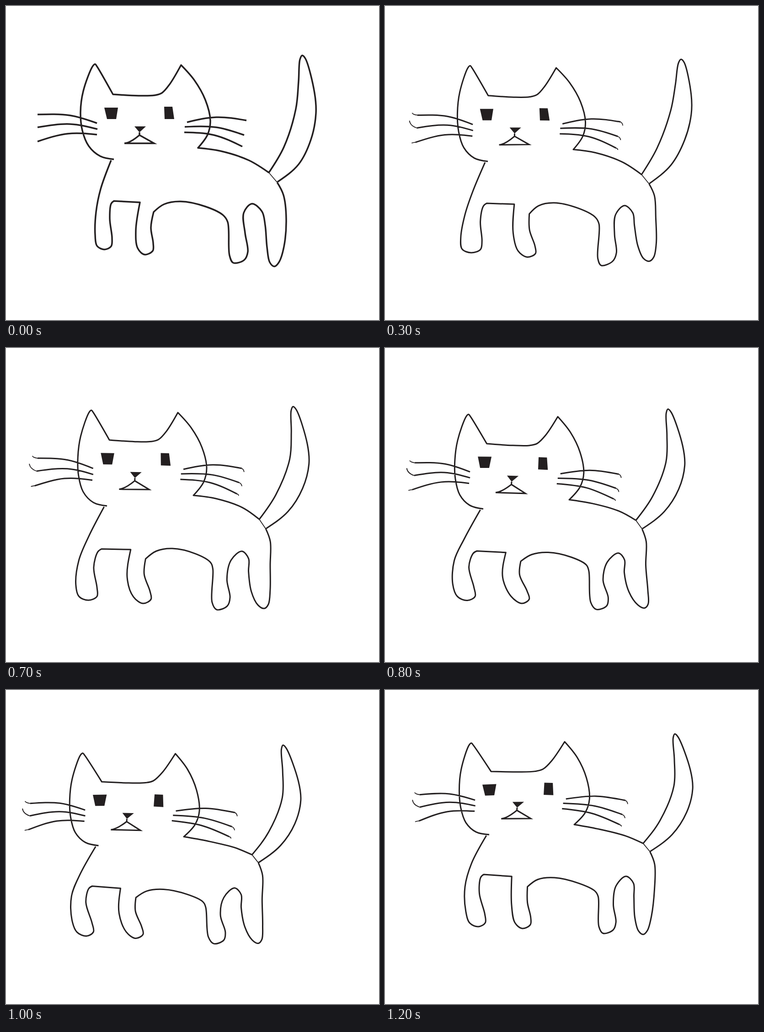
Animation of 816 by 686 pixels, one loop 1300 ms. Source, as an HTML page:

```html
<!DOCTYPE html>
<html lang="en">
<head>
<meta charset="utf-8">
<title>Walking cat</title>
<style>
  html, body { margin: 0; width: 100%; height: 100%; overflow: hidden; background: #fff; }
  svg { display: block; width: 816px; height: 686px; }
  path { fill: none; stroke: #231f20; stroke-linejoin: round; }
  #mouth { stroke-linejoin: miter; }
  #solid { fill: #231f20; stroke: none; }
</style>
</head>
<body>
<svg viewBox="0 0 816 686">
  <path id="thin" stroke-width="1.8"/>
  <path id="lines"/>
  <path id="mouth"/>
  <path id="solid"/>
</svg>
<script>
// The cat is drawn once; joints then pull the whole drawing into each pose.
const cat = {
  head: [236,335, 206,328, 181,306, 167,272, 163,232, 169,186, 190,131, 195,127, 199,132, 234,193],
  crown: [234,193, 290,196, 325,195, 341,190, 358,171, 383,129],
  cheek: [383,129, 412,162, 436,205, 447,250, 441,281, 420,310],
  back: [420,310, 470,317, 531,337, 575,364],
  tail: [575,364, 608,308, 634,225, 640,165, 643,117, 648,108, 655,115, 675,190, 678,235, 667,292, 640,346, 593,385],
  hind: [593,385, 607,413, 613,465, 608,526, 597,560, 587,569, 577,560, 571,527, 567,479, 560,449, 538,432,
    520,452, 523,496, 529,537, 521,555, 497,561, 489,545, 485,472, 475,457, 436,438, 382,427, 346,433, 323,450],
  fore: [323,450, 317,484, 322,518, 321,535, 303,543, 288,529, 284,490, 293,429],
  front: [236,426, 230,432, 227,465, 232,507, 230,525, 215,532, 199,524, 195,500, 197,450, 207,400, 230,337],
  eyes: [215,222, 245,222, 241,247, 221,247, 346,220, 364,220, 368,247, 347,247],
  face: [281,263, 306,263, 292,276, 292,282, 259,300, 324,300]
};

// Tip, middle and root, with the curl that grows at the tip.
const whiskers = [
  { line: [69,237, 140,239, 199,256], curl: [-11, -5] },
  { line: [69,265, 140,258, 200,269], curl: [-16, -16] },
  { line: [69,296, 135,279, 199,281], curl: [-8, 2] },
  { line: [526,250, 460,243, 396,254], curl: [5, 8] },
  { line: [521,282, 460,265, 391,264], curl: [6, 8] },
  { line: [517,307, 455,282, 390,276], curl: [4, 4] }
];

// Path of each joint through the key poses: stand, lift, plant, crouch, reach, rise.
const joints = Object.values({
  leftEar: [195,127, 183,134, 190,127, 187,136, 179,154, 173,122],
  rightEar: [383,129, 373,134, 376,136, 376,141, 380,159, 377,119],
  chin: [236,335, 226,341, 224,338, 221,345, 209,358, 212,322],
  nape: [420,310, 413,311, 411,316, 410,322, 396,341, 398,300],
  nose: [292,276, 283,279, 284,278, 282,284, 272,300, 273,263],
  leftWhisker: [69,265, 69,272, 70,261, 67,269, 60,288, 60,262],
  rightWhisker: [521,282, 507,281, 512,289, 510,294, 501,319, 503,278],
  tailTip: [648,108, 651,115, 644,118, 628,128, 610,139, 618,102],
  tailBend: [656,230, 652,232, 643,232, 642,248, 629,258, 637,219],
  tailBase: [584,375, 577,378, 562,380, 561,385, 550,387, 556,350],
  crotch: [538,432, 530,434, 518,438, 516,444, 505,452, 511,413],
  hindKnee: [590,478, 576,473, 560,481, 553,487, 538,491, 550,456],
  hindFoot: [587,569, 594,549, 563,566, 565,569, 571,567, 549,540],
  groin: [475,457, 470,460, 450,463, 447,468, 434,480, 443,445],
  nearKnee: [505,503, 492,507, 476,508, 464,512, 452,516, 465,482],
  nearFoot: [507,559, 485,561, 480,567, 470,569, 473,568, 470,535],
  belly: [382,427, 376,429, 364,431, 364,438, 350,455, 355,416],
  elbow: [308,440, 303,444, 295,444, 289,451, 272,463, 278,425],
  foreKnee: [301,488, 307,489, 293,499, 285,499, 269,498, 280,474],
  foreFoot: [303,543, 321,540, 301,557, 300,558, 299,558, 284,527],
  chest: [236,426, 226,431, 219,431, 209,439, 193,448, 200,409],
  frontKnee: [212,480, 196,480, 181,491, 172,495, 157,491, 175,467],
  frontFoot: [214,531, 193,527, 181,549, 179,550, 178,551, 187,522]
}).map(pairs);

// Start time, key pose (halves lie between two), shift of the whole cat.
const steps = [
  { at: 0, pose: 0 },
  { at: 100, pose: 0.5 },
  { at: 200, pose: 1 },
  { at: 300, pose: 1.5 },
  { at: 400, pose: 2 },
  { at: 700, pose: 3 },
  { at: 800, pose: 3.5 },
  { at: 900, pose: 4 },
  { at: 1000, pose: 4.5, shift: [-8, 0] },
  { at: 1100, pose: 5 },
  { at: 1200, pose: 5, shift: [16, -6] }
];
const loop = 1300;

function pairs(list) {
  return Array.from({ length: list.length / 2 }, (_, i) => list.slice(2 * i, 2 * i + 2));
}
const add = (a, b, k = 1) => a.map((v, i) => v + b[i] * k);
const poly = points => "M" + points.join("L");

// Gauss-Jordan elimination; each row ends with an x and a y result.
function solve(rows) {
  const n = rows.length;
  for (let c = 0; c < n; c++) {
    let best = c;
    for (let r = c; r < n; r++) if (Math.abs(rows[r][c]) > Math.abs(rows[best][c])) best = r;
    [rows[c], rows[best]] = [rows[best], rows[c]];
    const pivot = rows[c][c];
    rows[c] = rows[c].map(v => v / pivot);
    for (let r = 0; r < n; r++) {
      const k = rows[r][c];
      if (r !== c && k) rows[r] = add(rows[r], rows[c], -k);
    }
  }
  return rows.map(row => row.slice(n));
}

// Thin-plate warp that carries every joint to its place in the pose.
function makeWarp(pose, shift = [0, 0]) {
  const home = joints.map(track => track[0]);
  const terms = ([x, y]) => [
    ...home.map(([u, v]) => {
      const d = ((x - u) ** 2 + (y - v) ** 2) / 1e4;
      return d ? d * Math.log(d) : 0;
    }),
    1, x / 100, y / 100
  ];
  const from = Math.floor(pose), part = pose - from;
  const rows = joints.map(track => {
    const to = add(track[from], add(track[Math.ceil(pose)], track[from], -1), part);
    return [...terms(track[0]), ...add(to, track[0], -1)];
  });
  for (const sum of [() => 1, p => p[0] / 100, p => p[1] / 100]) {
    rows.push([...home.map(sum), 0, 0, 0, 0, 0]);
  }
  const weights = solve(rows);
  return point => terms(point).reduce((sum, t, i) => add(sum, weights[i], t), add(point, shift));
}

// Smooth curve through points, spaced by the root of their distance.
function curve(points) {
  const last = points.length - 1, gap = [], slope = [], tan = [];
  for (let i = 0; i < last; i++) {
    const step = add(points[i + 1], points[i], -1);
    gap[i] = Math.sqrt(Math.hypot(...step));
    slope[i] = step.map(v => v / gap[i]);
  }
  for (let i = 1; i < last; i++) {
    tan[i] = [0, 1].map(k => (gap[i - 1] * slope[i][k] + gap[i] * slope[i - 1][k]) / (gap[i - 1] + gap[i]));
  }
  const end = (s, t) => s.map((v, k) => (3 * v - t[k]) / 2);
  tan[0] = end(slope[0], tan[1]);
  tan[last] = end(slope[last - 1], tan[last - 1]);
  let path = "M" + points[0];
  for (let i = 0; i < last; i++) {
    path += "C" + [add(points[i], tan[i], gap[i] / 3), add(points[i + 1], tan[i + 1], -gap[i] / 3), points[i + 1]].join(" ");
  }
  return path;
}

function draw({ pose, shift }) {
  const warp = makeWarp(pose, shift);
  const place = list => pairs(list).map(warp);
  const chain = (...parts) => parts.map((part, i) =>
    curve(place(cat[part])).replace("M", i ? "L" : "M")).join("");

  const grown = Math.min(pose, 1);
  const tail = place(cat.tail), eyes = place(cat.eyes);
  const [a, b, tip, lip, left, right] = place(cat.face);
  let lines = chain("head", "crown", "cheek", "back") + chain("tail") + chain("hind", "fore", "front");
  let thin = poly([tail[0], tail[tail.length - 1]]);
  for (const { line, curl: [dx, dy] } of whiskers) {
    const points = place(line), end = points[0];
    lines += curve(points);
    thin += `M${end}Q${add(end, [dx * 0.9, dy * 0.3], grown)} ${add(end, [dx, dy], grown)}`;
  }
  return {
    pen: 3.5 - grown / 2,
    thin,
    lines,
    mouth: poly([tip, lip]) + `M${left}Q${add(left, [13, -1])} ${lip}L${right}L${left}`,
    solid: [eyes.slice(0, 4), eyes.slice(4), [a, b, tip]].map(p => poly(p) + "Z").join("")
  };
}

const byId = id => document.getElementById(id);
const drawings = steps.map(draw);
const start = performance.now();
let shown = -1;

function tick() {
  const time = (performance.now() - start) % loop;
  const now = steps.filter(({ at }) => at <= time).length - 1;
  if (now !== shown) {
    shown = now;
    const art = drawings[now];
    for (const id of ["thin", "lines", "mouth", "solid"]) byId(id).setAttribute("d", art[id]);
    for (const id of ["lines", "mouth"]) byId(id).setAttribute("stroke-width", art.pen);
  }
  requestAnimationFrame(tick);
}
tick();
</script>
</body>
</html>
```
